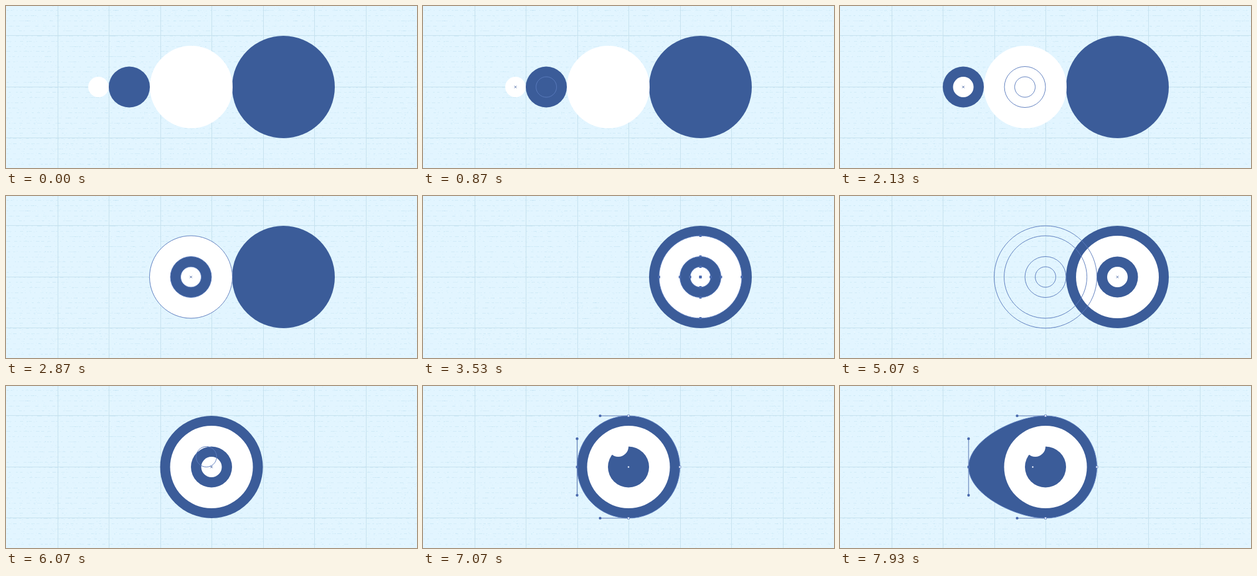
An HTML page with a canvas for the animation above (8000 ms loop, 700x277 px).

```html
<!DOCTYPE html>
<html lang="en">
<head>
<meta charset="utf-8">
<title>Drawing an eye from circles</title>
<style>
html, body { margin: 0; width: 100%; height: 100%; overflow: hidden; background: #e2f5ff; }
canvas { display: block; width: 100%; height: 100%; }
</style>
</head>
<body>
<canvas id="stage" width="700" height="277"></canvas>
<script>
const W = 700, H = 277, CY = 138.5, TAU = Math.PI * 2;
const LOOP = 8000, FRAME = 200 / 3, KAPPA = 0.5523;
const BLUE = '#3b5c99', WHITE = '#ffffff', LINE = '#5a7bbd', HANDLE = '#4b6baf';
const ctx = document.getElementById('stage').getContext('2d');

// Circles from back to front
const circles = [
  { x: 472.5, r: 87.5, fill: BLUE },
  { x: 315.5, r: 70.5, fill: WHITE },
  { x: 210, r: 35, fill: BLUE },
  { x: 157.5, r: 17.5, fill: WHITE }
];

// Moves in frames; "from" is the first selected circle in the stack
const moves = [
  { from: 3, select: 4, start: 6, end: 13, drop: 15, dx: 52.5, dy: 0 },
  { from: 2, select: 21, start: 24, end: 32, drop: 34, dx: 105, dy: 0 },
  { from: 1, select: 40, start: 43, end: 50, drop: 52, dx: 157.5, dy: 0 },
  { from: 0, select: 60, start: 66, end: 75, drop: 78, dx: -122.5, dy: 0 },
  { from: 3, select: 84, start: 88, end: 94, drop: 96, dx: -17.5, dy: -35 }
];
const stretch = { select: 103, start: 108, end: 116, drop: 118, dx: -43.5 };

const clamp = v => Math.min(1, Math.max(0, v));
const ease = v => v * v * (3 - 2 * v);
const progress = (m, f) => ease(clamp((f - m.start) / (m.end - m.start)));

function random(seed) {
  return () => {
    seed = (seed * 1664525 + 1013904223) >>> 0;
    return seed / 4294967296;
  };
}

function makePaper() {
  const paper = document.createElement('canvas');
  paper.width = W;
  paper.height = H;
  const p = paper.getContext('2d');
  const rnd = random(17);
  p.fillStyle = '#e2f5ff';
  p.fillRect(0, 0, W, H);
  // Faint, broken ruling and paper grain
  for (let y = 7.25; y < H; y += 8.75) {
    for (let x = rnd() * 6; x < W; x += 4 + rnd() * 9) {
      p.fillStyle = `rgba(125,185,212,${0.08 + rnd() * 0.14})`;
      p.fillRect(Math.round(x), Math.round(y), 2 + Math.floor(rnd() * 5), 1);
    }
  }
  for (let i = 0; i < 2600; i++) {
    p.fillStyle = rnd() < 0.55 ? 'rgba(150,205,226,.16)' : 'rgba(255,255,255,.25)';
    p.fillRect(Math.floor(rnd() * W), Math.floor(rnd() * H), 1 + Math.floor(rnd() * 2), 1);
  }
  p.fillStyle = '#c5e1ee';
  for (let x = 87.5; x < W; x += 87.5) p.fillRect(Math.round(x), 0, 1, H);
  for (let y = 50.5; y < H; y += 87.5) p.fillRect(0, Math.round(y - 0.1), W, 1);
  return paper;
}
const paper = makePaper();

function disc(x, y, r, fill) {
  ctx.beginPath();
  ctx.arc(x, y, r, 0, TAU);
  ctx.fillStyle = fill;
  ctx.fill();
}

function ring(x, y, r) {
  ctx.beginPath();
  ctx.arc(x, y, r, 0, TAU);
  ctx.strokeStyle = LINE;
  ctx.lineWidth = 1;
  ctx.stroke();
}

function square(x, y, size, fill) {
  ctx.fillStyle = fill;
  ctx.fillRect(x - size / 2, y - size / 2, size, size);
}

function cross(x, y) {
  ctx.beginPath();
  ctx.moveTo(x - 1.8, y - 1.8);
  ctx.lineTo(x + 1.8, y + 1.8);
  ctx.moveTo(x + 1.8, y - 1.8);
  ctx.lineTo(x - 1.8, y + 1.8);
  ctx.strokeStyle = '#40609f';
  ctx.lineWidth = 1;
  ctx.stroke();
}

function selectCircle(c) {
  ring(c.x, c.y, c.r);
  for (const [ux, uy] of [[1, 0], [-1, 0], [0, 1], [0, -1]]) {
    square(c.x + ux * c.r, c.y + uy * c.r, 4, HANDLE);
  }
  square(c.x, c.y, 4, HANDLE);
}

// Right half stays round while the left anchor is pulled out
function eyePath(left) {
  const x = 350, r = 87.5, k = r * KAPPA;
  ctx.beginPath();
  ctx.moveTo(x, CY - r);
  ctx.bezierCurveTo(x - k, CY - r, left, CY - k, left, CY);
  ctx.bezierCurveTo(left, CY + k, x - k, CY + r, x, CY + r);
  ctx.arc(x, CY, r, Math.PI / 2, -Math.PI / 2, true);
  ctx.closePath();
}

function eyeOutline(left) {
  eyePath(left);
  ctx.strokeStyle = LINE;
  ctx.lineWidth = 1;
  ctx.stroke();
}

function bar(x1, y1, x2, y2) {
  ctx.beginPath();
  ctx.moveTo(x1, y1);
  ctx.lineTo(x2, y2);
  ctx.strokeStyle = '#6480b9';
  ctx.lineWidth = 1.2;
  ctx.stroke();
}

function eyeHandles(left) {
  const x = 350, r = 87.5, k = r * KAPPA, top = CY - r, bottom = CY + r;
  bar(left, CY - k, left, CY + k);
  disc(left, CY - k, 2.3, HANDLE);
  disc(left, CY + k, 2.3, HANDLE);
  for (const y of [top, bottom]) {
    bar(x - k, y, x, y);
    disc(x - k, y, 2.3, HANDLE);
  }
  square(left, CY, 4, HANDLE);
  for (const [ax, ay] of [[x, top], [x, bottom], [x + r, CY]]) {
    square(ax, ay, 4, LINE);
    square(ax, ay, 2.4, WHITE);
  }
  square((left + x + r) / 2, CY, 2.4, '#e4ecfa');
}

function placeCircles(f) {
  const placed = circles.map(c => ({ ...c, y: CY }));
  for (const m of moves) {
    if (f < m.drop) break;
    for (const c of placed.slice(m.from)) {
      c.x += m.dx;
      c.y += m.dy;
    }
  }
  // Stacked circles share one centre
  if (f >= 52) placed[1].x = placed[0].x;
  return placed;
}

function drawMove(m, f, placed) {
  const group = placed.slice(m.from);
  if (f < m.start || f >= m.drop) {
    group.forEach(selectCircle);
    return;
  }
  const p = progress(m, f);
  const cx = group[group.length - 1].x;
  for (const c of group) ring(cx + m.dx * p, c.y + m.dy * p, c.r);
  cross(cx, CY);
}

function draw(f) {
  ctx.drawImage(paper, 0, 0);
  const placed = placeCircles(f);
  const baseLeft = 262.5;
  const left = baseLeft + (f >= stretch.drop ? stretch.dx : 0);

  placed.forEach((c, i) => {
    if (i === 0 && f >= stretch.select) {
      eyePath(left);
      ctx.fillStyle = BLUE;
      ctx.fill();
    } else {
      disc(c.x, c.y, c.r, c.fill);
    }
  });

  if (f >= stretch.select) {
    const tip = f < stretch.drop ? baseLeft + stretch.dx * progress(stretch, f) : left;
    eyeOutline(tip);
    eyeHandles(tip);
    return;
  }
  const current = moves.filter(m => f >= m.select).pop();
  if (current && f < current.drop + 5) drawMove(current, f, placed);
}

const origin = performance.now();
function tick() {
  const t = (performance.now() - origin) % LOOP;
  draw(Math.floor((t + 5) / FRAME) % 120);
  requestAnimationFrame(tick);
}
tick();
</script>
</body>
</html>
```
